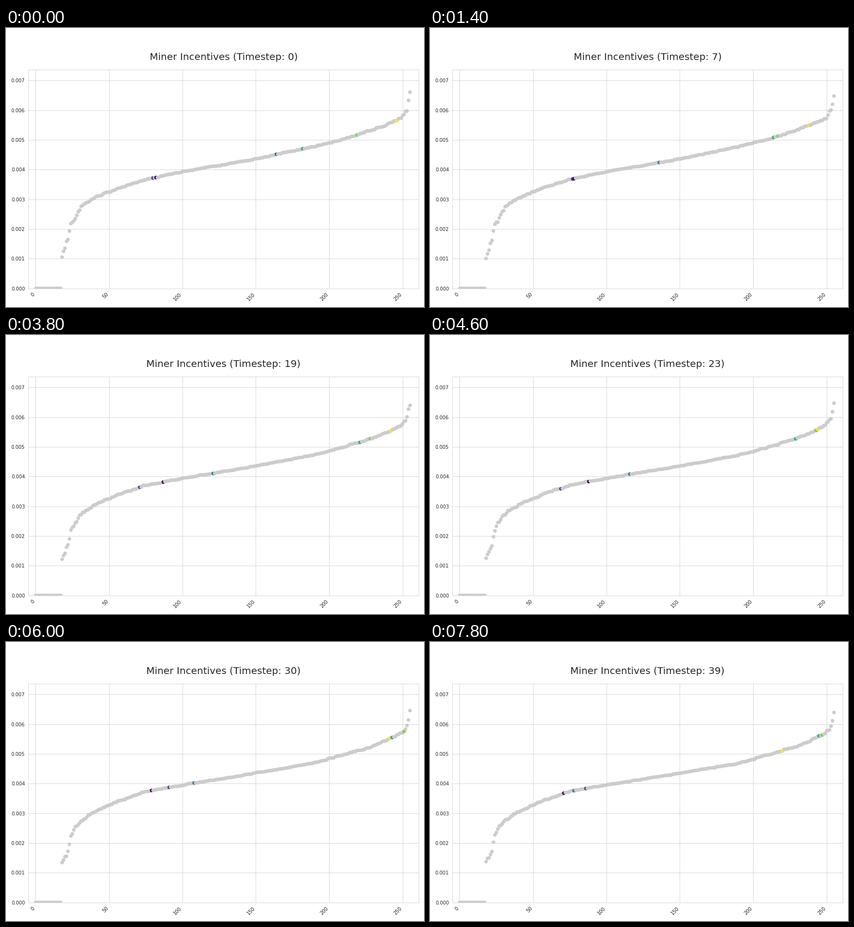
Write a matplotlib script that moves like this. It is 864 by 576 pixels and loops after 8 s.

```python
import numpy as np
import matplotlib.pyplot as plt
from matplotlib.animation import FuncAnimation

W, H, DPI = 864, 576, 72
STEPS, INTERVAL = 40, 200
COUNT, IDLE = 256, 18
GREY = (0.8, 0.8, 0.8, 1.0)
LINE, INK = "0.8", "0.15"
RANKS = np.arange(COUNT)

# Key points of the sorted curve: rank, incentive at the start and at the end
# (in units of 1e-5).
CURVE = np.array([
    (18, 104, 139), (22, 168, 171), (24, 214, 230), (27, 238, 256),
    (31, 277, 274), (40, 304, 305), (58, 340, 345), (75, 366, 374),
    (100, 393, 395), (145, 431, 431), (190, 478, 468), (210, 502, 497),
    (230, 535, 525), (247, 567, 564), (251, 586, 576), (253, 601, 592),
    (255, 655, 637),
])

# Rank of each highlighted miner at a few timesteps.
PATH_STEPS = [0, 7, 14, 23, 30, 34, 39]
PATHS = [
    [82, 78, 86, 88, 79, 80, 71],
    [80, 77, 74, 69, 91, 86, 86],
    [164, 136, 128, 116, 108, 90, 78],
    [182, 214, 210, 229, 243, 242, 245],
    [219, 217, 209, 243, 251, 245, 247],
    [246, 238, 240, 244, 241, 239, 220],
]
COLORS = plt.get_cmap("viridis")(np.linspace(0, 1, len(PATHS)))


def smooth(t):
    return t * t * (3 - 2 * t)


def incentives(step):
    t = smooth(step / (STEPS - 1))
    rank, start, end = CURVE.T
    values = np.interp(RANKS, rank, start + (end - start) * t)
    # Jitter grows with the slope; sorting turns it into small stairs.
    jitter = np.random.default_rng(step).normal(0, 1.2, COUNT)
    values += jitter * np.sqrt(np.gradient(values))
    values[:IDLE] = 0
    return np.sort(values) * 1e-5


def dot_colors(step):
    colors = np.tile(GREY, (COUNT, 1))
    taken = set()
    for path, color in zip(PATHS, COLORS):
        rank = round(np.interp(step, PATH_STEPS, path))
        while rank in taken:
            rank += 1
        taken.add(rank)
        colors[rank] = color
    return colors


plt.rcParams["font.family"] = "DejaVu Sans"
fig, ax = plt.subplots(figsize=(W / DPI, H / DPI), dpi=DPI, facecolor="white")
ax.set_xlim(-5, COUNT + 5)
ax.set_ylim(0, 0.007356)
ax.set_xticks(range(0, 251, 50))
ax.set_yticks(np.arange(8) / 1000)
ax.yaxis.set_major_formatter("{x:.3f}")
ax.set_axisbelow(True)
ax.grid(True, color=LINE, linewidth=0.8)
ax.tick_params(length=0, pad=7, labelsize=10, labelcolor=INK)
plt.setp(ax.get_xticklabels(), rotation=45, ha="right")
for spine in ax.spines.values():
    spine.set(color=LINE, linewidth=0.8)

title = ax.set_title("", fontsize=20, pad=20, color=INK)
dots = ax.scatter(RANKS, np.zeros(COUNT), s=36, linewidths=1.5)
fig.tight_layout()
fig.subplots_adjust(top=0.85)


def draw(step):
    dots.set_offsets(np.column_stack([RANKS, incentives(step)]))
    dots.set_color(dot_colors(step))
    title.set_text(f"Miner Incentives (Timestep: {step})")
    return dots, title


anim = FuncAnimation(fig, draw, frames=STEPS, interval=INTERVAL,
                     repeat=True, repeat_delay=0, blit=False)
plt.show()
```
